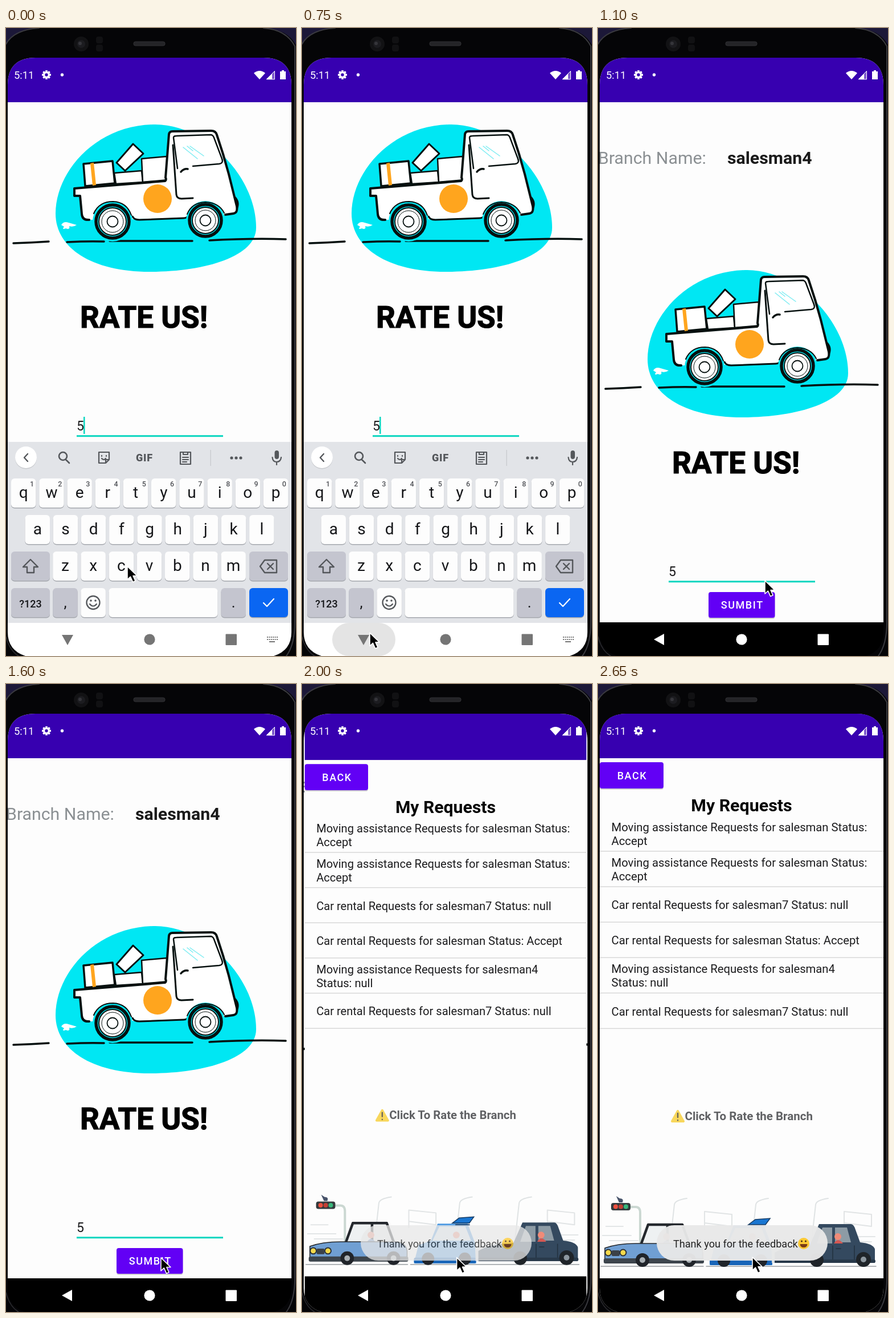
Recreate the animation shown at these times as an HTML page. Size 509 by 1100 pixels, loop 2.7 s.

```html
<!DOCTYPE html>
<html lang="en">
<head>
<meta charset="utf-8">
<title>Rate us</title>
<style>
  html, body { margin: 0; width: 100%; height: 100%; overflow: hidden; background: #050507; }
  svg { display: block; width: 100%; height: 100%; font-family: Roboto, "Noto Sans", sans-serif; }
</style>
</head>
<body>
<svg id="stage" viewBox="0 0 509 1100"></svg>
<script>
const LOOP = 2700, STEP = 50, PAN = 255;
const INK = '#06100f', CYAN = '#00e7f3', PURPLE = '#3700b0', VIOLET = '#6200f5', PAPER = '#fdfdfd', ICON = '#54575b';

const rect = (x, y, w, h, fill, r = 0, extra = '') =>
  `<rect x="${x}" y="${y}" width="${w}" height="${h}" rx="${r}" fill="${fill}" ${extra}/>`;
const circle = (x, y, r, fill, extra = '') => `<circle cx="${x}" cy="${y}" r="${r}" fill="${fill}" ${extra}/>`;
const shape = (d, fill, extra = '') => `<path d="${d}" fill="${fill}" ${extra}/>`;
const line = (d, color = INK, width = 4, fill = 'none', extra = '') =>
  shape(d, fill, `stroke="${color}" stroke-width="${width}" stroke-linecap="round" stroke-linejoin="round" ${extra}`);
const text = (x, y, size, str, fill = '#1c1c1e', extra = '') =>
  `<text x="${x}" y="${y}" font-size="${size}" fill="${fill}" ${extra}>${str}</text>`;
const group = (id, body, extra = '') => `<g id="${id}" ${extra}>${body}</g>`;
const MID = 'text-anchor="middle"', BOLD = 'font-weight="700"', MEDIUM = 'font-weight="500"';

function button(x, y, w, h, label) {
  return rect(x, y + 2, w, h, '#000', 4, 'opacity=".18"') + rect(x, y, w, h, VIOLET, 4) +
    text(x + w / 2 + 1, y + h / 2 + 6.5, 18, label, '#fff', `${MID} ${MEDIUM} letter-spacing="1.6"`);
}

function phone() {
  return rect(0, 0, 509, 1100, '#1c1838') +
    shape('M0 30Q14 2 62 0H452Q494 2 509 30V1100H0Z', '#050507') +
    line('M0 28Q14 3 58 0M452 0Q492 3 507 32V1040Q507 1080 492 1100', '#3a3a3f', 2) +
    line('M0 1066Q6 1090 22 1100', '#2c2c30', 1.5) +
    circle(132, 28, 13, '#121214') + circle(132, 28, 7, '#1c1c20') + circle(130, 27, 3, '#35353a') +
    rect(158, 15, 12, 12, '#111113', 4) + rect(158, 29, 12, 12, '#111113', 4) +
    rect(224, 24, 55, 7, '#242427', 3, 'stroke="#303034"');
}

function wheel(x, y, r) {
  return circle(x, y, r - 3, CYAN, `stroke="${INK}" stroke-width="5.5"`) +
    circle(x, y, r - 8, '#fff', `stroke="${INK}" stroke-width="2"`) +
    circle(x, y, r - 13, '#fff', `stroke="${INK}" stroke-width="1"`) +
    circle(x, y, 9.5, '#fff', `stroke="${INK}" stroke-width="1.8"`);
}

function truck() {
  return shape('M262 169C350 169 439 260 439 350C439 400 350 427 252 427C150 427 87 385 87 325C87 250 160 169 262 169Z', CYAN) +
    line('M13 377Q45 376 75 374M107 375Q145 373 172 374M182 373H327M357 372Q430 368 491 370', INK, 3.5) +
    line('M194 236L223 203L241 220L209 250Z', INK, 3, '#fff') +
    line('M190 254L238 250L240 270L193 273Z', INK, 2.5, '#fff') +
    line('M238 229L282 225L285 266L240 270Z', INK, 2.5, '#fff') +
    line('M136 238L187 233L191 272L139 277Z', INK, 3.5, '#fff') +
    shape('M148 237L154 236L158 275L152 276Z', '#ffa51e') +
    line('M402 297Q410 306 404 318', INK, 4) +
    shape('M120 281L279 267L287 182L365 181L387 245L406 312L404 325L385 328L318 332L225 335L150 336L134 335L130 294L121 294Z', '#fff') +
    line('M120 282V294H130L133 326Q134 337 146 336M120 281L279 268Q282 266 280 262L286 186Q287 181 292 181L360 180Q368 180 370 187Q382 222 391 256L405 312Q407 324 399 325L385 327', INK, 4) +
    line('M222 330Q225 336 234 336L312 333Q318 333 320 328', INK, 3) +
    line('M301 246L294 192Q294 189 299 189L359 187Q363 187 365 192L379 229Q382 237 374 238L328 242', INK, 2.5) +
    line('M293 205L299 292Q300 299 308 299L328 298', INK, 3) +
    line('M307 252Q312 246 319 247', INK, 3.5) +
    line('M311 209L336 229M323 207L347 224M318 207L328 215', '#7cecf2', 1.5) +
    circle(266, 299, 25, '#ffa51e') +
    circle(187, 339, 35, CYAN) + circle(350, 337, 34, CYAN) +
    line('M154 325Q163 304 188 304Q212 305 220 328M318 326Q326 306 350 305Q374 306 383 324', INK, 2) +
    wheel(187, 339, 32) + wheel(350, 337, 31) +
    shape('M97 345Q101 338 110 341Q117 343 124 345Q118 349 111 347Q113 354 105 351Q97 354 102 348Z', '#fff');
}

function ratePage() {
  return rect(3, 130 - PAN, 498, 911 + PAN, PAPER) +
    rect(3, 1041, 498, 600, '#000') +
    text(0, 238, 30.3, 'Branch Name:', '#8b9093') +
    text(227, 238, 30.3, 'salesman4', '#1b1b1b', BOLD) +
    `<g transform="translate(0 ${PAN})">${truck()}</g>` +
    text(130, 780, 53, 'RATE US!', '#000', `${BOLD} stroke="#000" stroke-width="1.2"`) +
    text(124, 960, 23, '5') +
    rect(124, 968.2, 257, 3, '#0bd6c0') +
    rect(136, 936, 2.5, 30, '#0bd6c0', 0, 'id="caret"') +
    button(194, 988, 116.5, 45, 'SUMBIT');
}

function car(x, color, dark, roof) {
  return `<g transform="translate(${x} 0)">` +
    shape('M66 982L78 948H142L156 980Z', '#eef1f2') +
    line('M68 980L80 947H140L152 980M114 948V980', roof, 4.5) +
    circle(112, 968, 6, '#ef8d78') + shape('M104 982Q112 968 121 982Z', '#5b84b8') +
    line('M4 988Q28 979 66 980H158Q174 982 176 996V1010H4Z', roof, 1.5, color) +
    rect(16, 992, 14, 10, '#3b4148', 2) +
    rect(2, 1006, 176, 9, dark, 3) +
    circle(10, 996, 5.5, '#f5d94b', 'stroke="#2b3138" stroke-width="2"') +
    circle(36, 996, 5.5, '#f5d94b', 'stroke="#2b3138" stroke-width="2"') +
    circle(70, 1009, 12, '#20242a') + circle(70, 1009, 5, '#a9b0b5') +
    circle(152, 1009, 12, '#20242a') + circle(152, 1009, 5, '#a9b0b5') + '</g>';
}

function street() {
  const lamp = x => line(`M${x} 975L${x + 7} 912Q${x + 8} 904 ${x + 29} 901`, '#dfe3e4', 2);
  const sign = x => line(`M${x} 955V924L${x + 48} 929V950L${x} 944`, '#e1e4e5', 2);
  return lamp(127) + lamp(270) + lamp(375) + sign(187) + sign(432) +
    line('M14 950H44M8 966H58M20 975H70M430 968H486M440 977H480', '#e3e6e7', 2) +
    line('M56 916H66Q74 916 74 926V985', '#cbd8d2', 4) +
    rect(23, 909, 34, 13, '#343a3d', 4) +
    circle(31, 915.5, 4, '#ee5140') + circle(40, 915.5, 4, '#c23f35') + circle(49, 915.5, 4, '#39b77b') +
    shape('M32 897L38 901Q46 901 43 908H37Z', '#47536a') +
    line('M5 1020H185M190 1020H310M300 1020H488', '#9a9fa3', 1.5) +
    car(8, '#709fd3', '#3d454d', '#24282d') +
    shape('M196 1018L204 986L226 978L238 948H291L304 982L306 1018Z', '#4f9be2') +
    shape('M229 978L241 953H287L297 978Z', '#dce9f2') + circle(271, 968, 6, '#ef8d78') +
    rect(196, 1008, 110, 10, '#1865b8', 3) +
    shape('M264 947L276 938L302 936L294 947Z', '#1976d2', 'stroke="#173b63" stroke-width="1.5"') +
    line('M270 950H294', '#173b63', 2) +
    circle(221, 1010, 11, '#20242a') + circle(286, 1010, 11, '#20242a') +
    shape('M305 990Q341 980 381 980V1014H305Z', '#d9dde0') +
    shape('M372 982L388 946H444Q449 946 452 956L460 978Q483 980 486 990V1014H310V996Q330 984 372 982Z', '#34495f') +
    shape('M384 980L394 952H411V980ZM416 952H437L444 978H416Z', '#8d9ba5') +
    circle(421, 968, 6, '#f08b78') + shape('M414 980Q421 968 430 980Z', '#d45752') +
    line('M412 984V1010M450 984V1008M418 989H426', '#22313f', 1.5) +
    rect(310, 1008, 177, 6, '#28394a', 3) +
    circle(384, 1009, 12, '#1f2429') + circle(466, 1008, 13, '#1f2429') + circle(466, 1008, 5, '#8c969e');
}

function requestsPage() {
  const rows = [
    ['Moving assistance Requests for salesman Status:', 'Accept'],
    ['Moving assistance Requests for salesman Status:', 'Accept'],
    ['Car rental Requests for salesman7 Status: null'],
    ['Car rental Requests for salesman Status: Accept'],
    ['Moving assistance Requests for salesman4', 'Status: null'],
    ['Car rental Requests for salesman7 Status: null']
  ];
  const list = rows.map((lines, i) => {
    const base = 270 + i * 62.1 - (lines.length - 1) * 12;
    return lines.map((s, j) => text(23.5, base + j * 24, 20.25, s)).join('') +
      rect(3, 292.2 + i * 62.1, 498, 1.4, '#d6d6d6');
  }).join('');
  return rect(3, 52, 498, 78, PURPLE) + rect(3, 130, 498, 911, PAPER) + rect(3, 1041, 498, 200, '#000') +
    button(3, 137, 112, 46, 'BACK') +
    text(252, 223, 30.4, 'My Requests', '#050505', `${MID} ${BOLD}`) + list +
    line('M140 748L150 766H130Z', '#f8d75c', 4, '#f8d75c') +
    line('M140 752V759M140 764V764.2', '#6a665a', 2.4) +
    text(152.5, 763.5, 20.5, 'Click To Rate the Branch', '#606164', BOLD) + street();
}

function key(x, y, w, fill, label = '', size = 28, weight = '') {
  return rect(x, y + 1.5, w, 51, '#a5a8ae', 6) + rect(x, y, w, 51, fill, 6) +
    (label && text(x + w / 2, y + 33.5, size, label, '#151619', `${MID} ${weight}`));
}

function keyboard() {
  const PITCH = 49.2, GREY = '#c4c5cf';
  const row = (letters, x, y) => [...letters].map((c, i) => key(x + i * PITCH, y, 43.5, PAPER, c)).join('');
  const digits = [...'1234567890'].map((d, i) => text(45.5 + i * PITCH, 803, 12.5, d, '#505257', `${MID} ${MEDIUM}`)).join('');
  const tools = line('M93 750A7 7 0 1 1 107 750A7 7 0 1 1 93 750M105 756L111 762', ICON, 2.6) +
    line('M163 743H181V756L175 762H163ZM175 762V756H181M168 749V750M176 749V750M168 754Q172 758 175 754', ICON, 2.2) +
    text(243, 759, 18, 'GIF', ICON, `${MID} font-weight="900" letter-spacing=".8"`) +
    line('M306 743H324V764H306ZM311 743V747H319V743M310 752H320M310 756H320M310 760H317', ICON, 2.2) +
    rect(358.5, 739, 1.2, 28, '#c5c8cc') +
    [396, 404, 412].map(x => circle(x, 753, 2.6, ICON)).join('');
  return rect(3, 725, 498, 318, '#e2e4e8') + rect(3, 1042, 498, 58, '#fff') +
    circle(35, 753.5, 19, '#c9cbcf') + circle(35, 752, 19, '#fff') +
    line('M38 746L32 752.5L38 759', ICON, 2.4, 'none', 'id="chevron"') +
    group('tools', tools) +
    rect(471.5, 740, 7.5, 15, ICON, 4) + line('M467.5 752Q468 760 475 760Q482 760 483 752M475 760V765', ICON, 2.2) +
    row('qwertyuiop', 9, 789) + digits + row('asdfghjkl', 33.5, 853) + row('zxcvbnm', 82.2, 917) +
    key(9, 917, 68, GREY) + key(427, 917, 68, GREY) +
    line('M43 931L56 944H49V954H37V944H30Z', ICON, 2.4) +
    line('M446 943L454 932H475V954H454ZM459 938L469 948M469 938L459 948', ICON, 2.4) +
    key(9, 981, 68, GREY, '?123', 18, MEDIUM) + key(82.2, 981, 43.5, GREY, ',', 26) + key(131.4, 981, 43.5, PAPER) +
    circle(153, 1006.5, 11.5, 'none', `stroke="${ICON}" stroke-width="2.3"`) +
    circle(149, 1003, 1.8, ICON) + circle(157, 1003, 1.8, ICON) + line('M147 1009Q153 1016 159 1009', ICON, 2.2) +
    key(180.5, 981, 191, PAPER) + key(377.5, 981, 43.5, GREY, '.', 26) + key(427, 981, 68, '#0a66f2') +
    line('M452 1007L458 1013L470 1000', '#fff', 2.2);
}

function statusIcons() {
  const teeth = Array.from({ length: 8 }, (_, i) =>
    rect(69.2, 74, 3.6, 4, '#fff', .5, `transform="rotate(${i * 45} 71 82)"`)).join('');
  return text(14, 89, 18.3, '5:11', '#fff') + teeth +
    circle(71, 82, 4.4, 'none', 'stroke="#fff" stroke-width="3.4"') + circle(98.5, 82, 2.7, '#fff') +
    shape('M435 79Q445 71 455 79L445 90Z', '#fff') +
    shape('M457 90L472 75V90Z', '#fff', 'opacity=".35"') + shape('M457 90L467 80V90Z', '#fff') +
    line('M457.5 89.5L471.5 75.5V89.5Z', '#fff', 1) +
    shape('M481 76H484V74H488V76H491V90H481Z', '#fff');
}

const toast = rect(103, 948, 300, 62, '#e9e9e9', 31, 'opacity=".96"') +
  text(132, 986.5, 18.1, 'Thank you for the feedback', '#222') +
  circle(361, 980, 10, '#fcc934') + shape('M354.5 981H367.5Q367 987 361 987Q355 987 354.5 981Z', '#7a3b16') +
  circle(357.5, 976, 1.6, '#4e3018') + circle(364.5, 976, 1.6, '#4e3018');

const dots = [0, 1, 2, 3, 4, 5].map(i => rect(458 + i * 3.4, 1066, 2, 2, '#757575') + rect(458 + i * 3.4, 1070, 2, 2, '#757575')).join('') +
  rect(462, 1074, 10, 2, '#757575');

const stage = document.getElementById('stage');
stage.innerHTML =
  `<defs><clipPath id="screen">${shape('M3 100Q3 52 52 52H452Q501 52 501 100V1058Q501 1090 470 1100H34Q3 1090 3 1058Z', '#000')}</clipPath></defs>` +
  phone() +
  `<g clip-path="url(#screen)">` + rect(3, 52, 498, 1048, '#000') +
  group('rate', group('pan', ratePage()) + rect(3, 52, 498, 78, PURPLE)) +
  group('requests', requestsPage()) +
  group('keyboard', keyboard()) +
  rect(53, 1042, 111, 58, '#000', 29, 'id="ripple"') +
  group('nav', '<path id="back" d="M98 1071L116 1061V1081Z"/><circle cx="252" cy="1071" r="9.6"/>' +
    '<rect x="385.5" y="1061.5" width="19.5" height="19.5" rx="1"/>') +
  group('dots', dots) + group('toast', toast) + statusIcons() + '</g>' +
  group('pointer', shape('M0 0V23L5.4 18L9.6 27.4L14 25.5L10 16.5H17Z', '#000', 'stroke="#fff" stroke-width="1.6" stroke-linejoin="round"'));

const el = Object.fromEntries([...stage.querySelectorAll('[id]')].map(node => [node.id, node]));
const set = (id, attr, value) => el[id].setAttribute(attr, value);
const ramp = (t, from, to) => Math.min(1, Math.max(0, (t - from) / (to - from)));
const smooth = p => p * p * (3 - 2 * p);
const bezier = (a, b, c, d, u) => a * (1 - u) ** 3 + 3 * b * (1 - u) ** 2 * u + 3 * c * (1 - u) * u * u + d * u ** 3;

// Two-part curve: quick start, very slow finish.
function openEase(p) {
  const [xs, ys] = p < 1 / 6 ? [[0, .05, .1333, 1 / 6], [0, 0, .06, .4]] : [[1 / 6, .2083, .25, 1], [.4, .82, 1, 1]];
  let lo = 0, hi = 1;
  for (let i = 0; i < 20; i++) {
    const mid = (lo + hi) / 2;
    if (bezier(...xs, mid) < p) lo = mid; else hi = mid;
  }
  return bezier(...ys, lo);
}

const POINTER = [[0, 213, 943], [100, 213, 943], [600, 119, 1060], [870, 119, 1059], [1100, 293, 968], [1450, 272, 1005], [LOOP, 271, 1004]];
function pointerAt(t) {
  const i = POINTER.findIndex(k => k[0] > t);
  const [t0, x0, y0] = POINTER[i - 1], [t1, x1, y1] = POINTER[i];
  const p = smooth(ramp(t, t0, t1));
  return `translate(${x0 + (x1 - x0) * p} ${y0 + (y1 - y0) * p})`;
}
const zoom = s => `translate(252 575) scale(${s}) translate(-252 -575)`;

function draw(t) {
  const closing = ramp(t, 800, 900);
  set('keyboard', 'opacity', 1 - closing);
  set('keyboard', 'transform', `translate(0 ${126 * closing})`);
  set('tools', 'opacity', closing > 0 ? 0 : 1);
  set('chevron', 'transform', closing > 0 ? 'rotate(180 35 752.5)' : '');
  set('dots', 'opacity', closing > 0 ? 0 : 1);
  set('pan', 'transform', `translate(0 ${-PAN * (1 - ramp(t, 800, 1050)) ** 2.44})`);
  set('caret', 'opacity', t < 1050 ? 1 : 0);

  set('ripple', 'opacity', .105 * ramp(t, 600, 700) * (1 - ramp(t, 800, 900)));
  const shade = closing > 0 ? 85 + 170 * ramp(t, 850, 1000) : 117;
  set('nav', 'fill', `rgb(${shade},${shade},${shade})`);
  set('back', 'transform', `rotate(${-90 * (1 - smooth(ramp(t, 800, 950)))} 108 1071)`);
  set('back', 'opacity', closing > 0 && closing < 1 ? .3 : 1);

  const opened = openEase(ramp(t, 1800, 2200));
  set('rate', 'transform', zoom(1 + .15 * opened));
  set('requests', 'transform', zoom(.85 + .15 * opened));
  set('requests', 'opacity', ramp(t, 1850, 1933));
  set('toast', 'opacity', ramp(t, 1850, 2040));
  set('pointer', 'transform', pointerAt(t));
}

const start = performance.now();
function tick() {
  const t = (performance.now() - start) % LOOP;
  draw(Math.floor(t / STEP) * STEP);
  requestAnimationFrame(tick);
}
tick();
</script>
</body>
</html>
```
